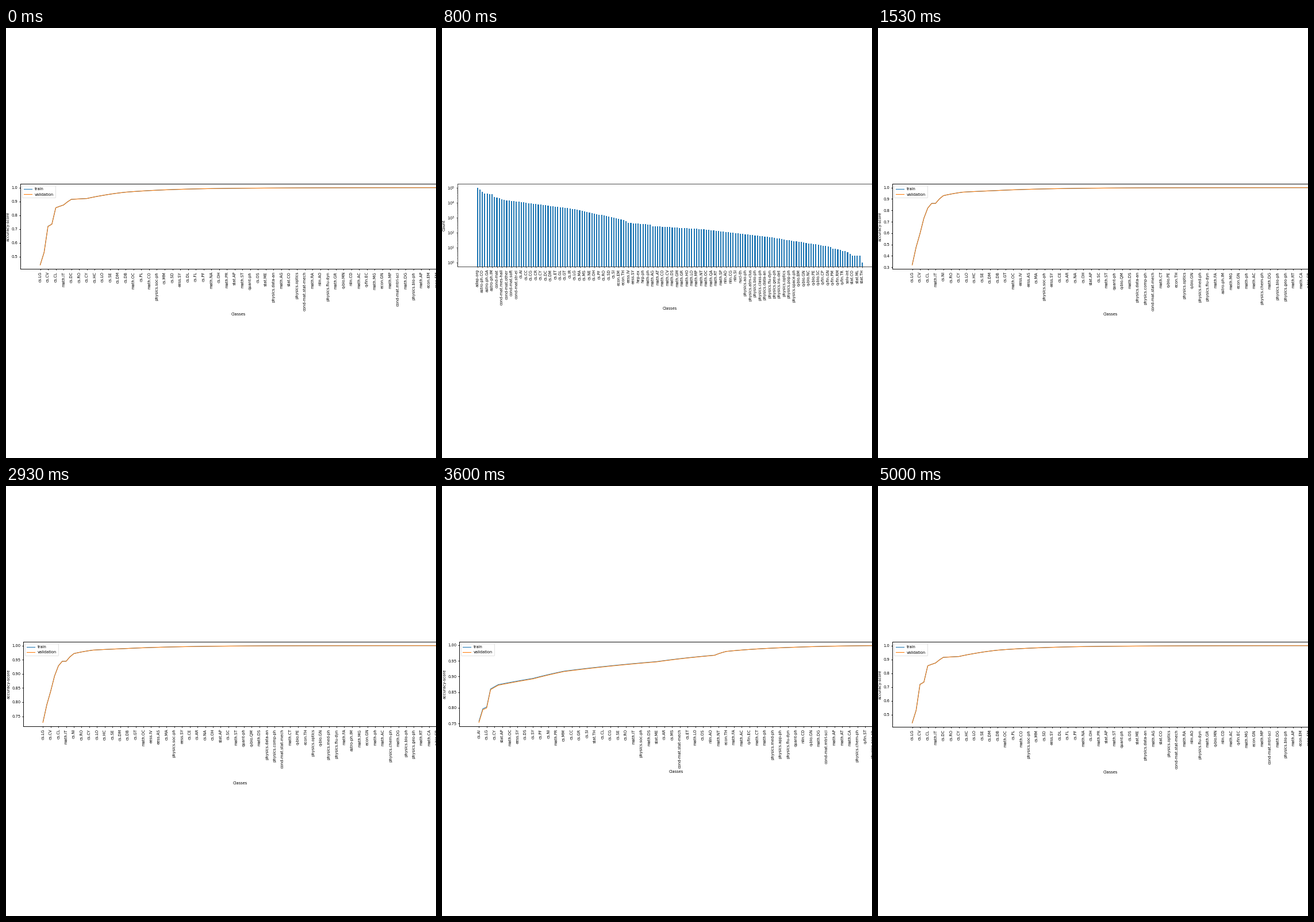
A matplotlib script for the animation above (5.6 s loop, 748x748 px).

```python
import numpy as np
import matplotlib.pyplot as plt
from matplotlib.animation import FuncAnimation

SIZE, DPI = 748, 100
LOOP, STEP = 5600, 40
CLASSES, TOP, RIGHT = 103, 271, 784
BLUE, ORANGE = "#1f77b4", "#ff7f0e"

fig = plt.figure(figsize=(SIZE / DPI, SIZE / DPI), dpi=DPI, facecolor="white")


def decay(points, n=CLASSES):
    """Geometric decay through a few (index: value) points."""
    return np.exp(np.interp(np.arange(n), list(points), np.log(list(points.values()))))


def make_axes(left, right, bottom, k, line):
    ax = fig.add_axes([left / SIZE, 1 - bottom / SIZE,
                       (right - left) / SIZE, (bottom - TOP) / SIZE])
    ax.patch.set_visible(False)
    ax.tick_params(which="major", length=3.5 * k, width=line, pad=3.5 * k, labelsize=10 * k)
    ax.tick_params(which="minor", length=2 * k, width=0.6 * k)
    for spine in ax.spines.values():
        spine.set_linewidth(line)
    return ax


def name_axes(ax, labels, ylabel, k, drop=0):
    ax.set_xticks(range(0, 2 * len(labels), 2), labels, rotation=90)
    ax.set_xlabel("Classes", fontsize=10 * k, labelpad=4 * k + drop)
    ax.set_ylabel(ylabel, fontsize=10 * k, labelpad=4 * k)
    ax.set_visible(False)
    return ax


def score_chart(left, bottom, train_error, valid_error, labels, drop=0):
    k = (RIGHT - left) / 15.5 / DPI
    ax = make_axes(left, RIGHT, bottom, k, 0.68)
    ax.plot(1 - train_error, color=BLUE, lw=1.6 * k, label="train")
    ax.plot(1 - valid_error, color=ORANGE, lw=1.6 * k, label="validation")
    legend = ax.legend(loc="upper left", fontsize=10 * k)
    legend.get_frame().set_linewidth(k)
    return name_axes(ax, expand(labels), "accuracy-score", k, drop)


def count_chart(counts, low, high, labels):
    k = 0.476
    ax = make_axes(27, 765.5, 415, k, 0.5)
    ax.bar(range(len(counts)), np.round(counts), 0.5, color=BLUE, log=True)
    ax.set_ylim(10 ** low, 10 ** high)
    return name_axes(ax, expand(labels), "Count", k)


def expand(text):
    """'cs:AI,CC' becomes cs.AI, cs.CC; other words stay as they are."""
    names = []
    for word in text.split():
        head, _, tails = word.partition(":")
        names += [f"{head}.{t}" for t in tails.split(",")] if tails else [head]
    return names


FLAT = """cs:LG,CV,CL math.IT cs:DC,RO,CY,HC,LO,SE,DM,DB math.OC cs.PL math.CO
physics.soc-ph cs:MM,SD eess.SY cs:DL,FL,PF math.NA cs.OH math.PR stat.AP math.ST quant-ph
cs.OS stat.ME physics.data-an math.AG stat.CO physics.optics cond-mat.stat-mech math.RA
nlin.AO physics.flu-dyn math.GR q-bio.MN nlin.CD math.AC q-fin.EC math.MG econ.GN math.MP
cond-mat.mtrl-sci math.DG physics.bio-ph math.AP econ:EM,EM"""

STEEP = """cs:LG,CV,CL math.IT cs:NI,RO,CY,LO,HC,SE,DM,DB,GT math.OC eess:IV,AS cs.MA
physics.soc-ph eess.SY cs:CE,AR,NA,OH stat.AP cs.SC math.ST quant-ph q-bio.QM math.DS
physics:data-an,comp-ph cond-mat.stat-mech math.CT q-bio.PE econ.TH physics.optics q-bio.GN
physics:med-ph,flu-dyn math.FA astro-ph.IM math.MG econ.GN math-ph math.AC physics.chem-ph
math.DG physics:bio-ph,geo-ph math:RT,CA q-bio.CB"""

SPLIT = """cs.LG stat.ML cs:CL,IT,NI,DC,CY,NE,SY,HC,SE eess.SP cs:DB,GT,PL physics.soc-ph
eess:SY,AS cs:GR,PF,NA math.NA stat.AP cs.DL stat.TH q-bio.NC quant-ph math.DS cs.MS
q-bio.QM stat.CO cs.OS nlin.AO econ.TH math.AT q-bio.PE math:FA,MG nlin.CD physics.med-ph
math:AC,MP astro-ph.IM q-bio:MN,BM cond-mat.mtrl-sci econ.EM nlin.CG physics.bio-ph
math:RT,CA physics.geo-ph"""

SLOW = """cs:AI,LG,CY stat.AP math.OC eess.SY cs:DS,SY,PF,NI math.PR cs:MM,CC,GR,SI stat.TH
cs:CL,CG,SE,RO math.IT physics.soc-ph math.DS stat.ME cs:AR,MS cond-mat.stat-mech cs.ET
math.LO cs.OS nlin.AO math.NT econ.TH math:FA,AC q-fin.EC math.CT math-ph
physics:med-ph,app-ph,flu-dyn quant-ph nlin.CD q-bio.GN math.DG cond-mat.mtrl-sci
math:AP,AT,CA physics.chem-ph q-fin.ST physics.geo-ph"""

ALL = """adap-org astro-ph:CO,GA,IM cond-mat cond-mat:mes-hall,other,soft,str-el
cs:AI,CC,CG,CR,CY,DC,DM,ET,GL,GT,IR,LG,MA,MS,NE,OH,PF,RO,SD,SI econ:EM,TH eess:IV,SY
hep-ex hep-ph math-ph math:AG,AT,CO,CV,DS,GM,GR,HO,LO,MP,NT,OC,QA,RT,SP nlin:AO,CG,SI
nucl-th physics:ao-ph,atm-clus,bio-ph,class-ph,data-an,flu-dyn,geo-ph,ins-det,optics
physics:pop-ph,space-ph q-bio:BM,GN,NC,PE,SC q-fin:CP,GN,PM,RM,TR solv-int stat:CO,ML,TH"""

# Error (1 - accuracy) per class, sorted from worst to best
flat = decay({0: .56, 1: .47, 2: .281, 3: .265, 4: .146, 6: .126, 8: .085, 12: .079,
              16: .057, 22: .033, 44: .007, 102: .0003})
steep = decay({0: .68, 2: .405, 4: .18, 5: .139, 6: .139, 8: .071, 13: .04, 21: .027,
               36: .01, 60: .002, 102: .0004})
split_train = decay({0: .121, 1: .088, 3: .0525, 4: .029, 8: .025, 24: .0095,
                     45: .0024, 102: .0002})
split = decay({0: .193, 2: .0996, 3: .0967, 4: .0574, 5: .0465, 11: .042, 21: .025,
               36: .013, 48: .006, 65: .0025, 102: .002})
slow_train = decay({0: .243, 1: .203, 2: .1975, 3: .14, 5: .126, 14: .106, 22: .083,
                    46: .0525, 61: .032, 64: .02, 82: .0065, 102: .0015})
slow = slow_train * np.where(np.arange(CLASSES) < 62, 1.015, 1)

counts = decay({0: 1e5, 3: 41700, 6: 38000, 7: 24500, 12: 14500, 18: 11200, 39: 4000,
                60: 740, 62: 457, 71: 355, 72: 282, 94: 166, 119: 55, 143: 13,
                152: 5, 154: 3, 157: 3, 158: 1}, 159)

flat_chart = score_chart(25, 419, flat * 0.997, flat, FLAT)
scenes = [
    (0, flat_chart),
    (130, count_chart(counts ** 0.8, -0.2, 4.22, ALL)),
    (800, count_chart(counts, -0.25, 5.27, ALL)),
    (1530, score_chart(25, 419, steep * 0.997, steep, STEEP)),
    (2200, score_chart(34, 417, split_train, split, SPLIT)),
    (2930, score_chart(30, 418, steep * 0.398, steep * 0.4, STEEP, 14.5)),
    (3600, score_chart(30, 418, slow_train, slow, SLOW)),
    (4330, score_chart(30, 418, slow_train * 1.15, slow * 1.15, SLOW)),
    (5000, flat_chart),
]
starts = [round(t / STEP) for t, _ in scenes]


def update(i):
    current = scenes[np.searchsorted(starts, i, side="right") - 1][1]
    for _, ax in scenes:
        ax.set_visible(ax is current)
    return [current]


anim = FuncAnimation(fig, update, frames=LOOP // STEP, interval=STEP,
                     repeat=True, repeat_delay=0, blit=False)
plt.show()
```
